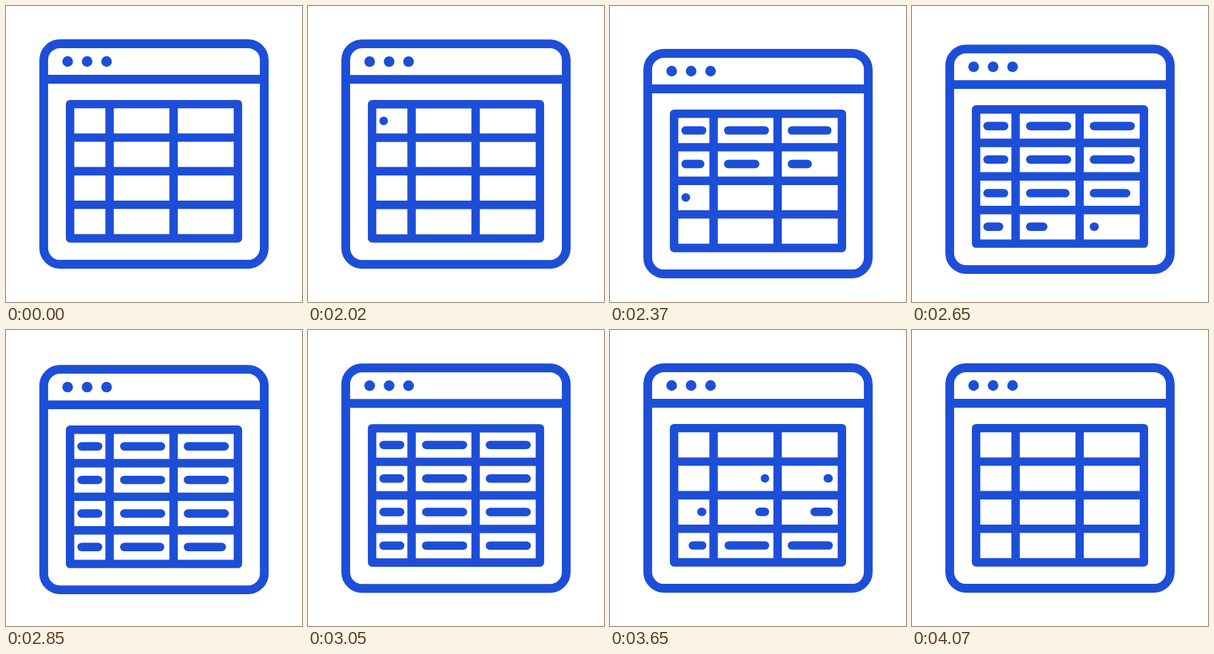
An HTML page for the animation above (4.1 s loop, 400 by 400 pixels).

```html
<!DOCTYPE html>
<html lang="en">
<head>
<meta charset="utf-8">
<title>Table filling</title>
<style>
  html, body { margin: 0; width: 100%; height: 100%; overflow: hidden; background: #fff; }
  svg { display: block; width: 100vw; height: 100vh; }
  .lines { fill: none; stroke: #1d4ed8; stroke-width: 11.4; }
  .frame { stroke-width: 11.8; }
  .bars { stroke-linecap: round; }
  .dots { fill: #1d4ed8; }
</style>
</head>
<body>
<svg viewBox="0 0 400 400">
  <g id="window">
    <g class="lines frame">
      <rect x="51" y="51" width="298" height="298" rx="22"/>
      <path d="M51 99H349"/>
    </g>
    <g class="dots">
      <circle cx="83.3" cy="75" r="7.2"/>
      <circle cx="109.6" cy="75" r="7.2"/>
      <circle cx="135.9" cy="75" r="7.2"/>
    </g>
    <g class="lines">
      <rect x="86.6" y="132.6" width="226.8" height="181.4" stroke-linejoin="round"/>
      <path d="M86.6 177.9H313.4M86.6 223.2H313.4M86.6 268.6H313.4M140 132.6V314M226.5 132.6V314"/>
    </g>
    <g id="bars" class="lines bars"></g>
  </g>
</svg>
<script>
const LOOP = 4100;
const BAR_TIME = 350;
const GROW = { start: 2005, row: 172, col: 55 };
const SHRINK = { start: 3082, row: 161, col: 67 };
const COLUMNS = [[102.1, 124.5], [159.8, 209.4], [245.9, 295.4]];
const DROP = 13;

const clamp = v => Math.min(1, Math.max(0, v));

// Cubic bezier easing from (0,0) to (1,1) with flat ends
function ease(x1, x2) {
  return x => {
    let lo = 0, hi = 1;
    for (let i = 0; i < 24; i++) {
      const u = (lo + hi) / 2, v = 1 - u;
      if (3 * u * v * v * x1 + 3 * u * u * v * x2 + u ** 3 < x) lo = u;
      else hi = u;
    }
    return lo * lo * (3 - 2 * lo);
  };
}
const barEase = ease(0.28, 0.1);
const dropEase = ease(0.333, 0.333);

const win = document.getElementById('window');
const group = document.getElementById('bars');
const bars = [];
for (let row = 0; row < 4; row++) {
  COLUMNS.forEach(([left, right], col) => {
    const line = document.createElementNS('http://www.w3.org/2000/svg', 'line');
    const y = 155.1 + row * 45.35;
    line.setAttribute('y1', y);
    line.setAttribute('y2', y);
    group.append(line);
    const at = phase => phase.start + row * phase.row + col * phase.col;
    bars.push({ line, left, right, grow: at(GROW), shrink: at(SHRINK) });
  });
}

const progress = (t, start, length) => clamp((t - start) / length);

function draw(t) {
  const down = dropEase(progress(t, 2005, 365));
  const up = dropEase(progress(t, 2370, 800));
  win.setAttribute('transform', `translate(0 ${(DROP * (down - up)).toFixed(3)})`);

  for (const { line, left, right, grow, shrink } of bars) {
    const visible = t >= grow && t < shrink + BAR_TIME;
    line.setAttribute('visibility', visible ? 'visible' : 'hidden');
    if (!visible) continue;
    const width = right - left;
    line.setAttribute('x1', left + width * barEase(progress(t, shrink, BAR_TIME)));
    line.setAttribute('x2', left + width * barEase(progress(t, grow, BAR_TIME)) + 0.01);
  }
}

const begin = performance.now();
function tick() {
  draw((performance.now() - begin) % LOOP);
  requestAnimationFrame(tick);
}
tick();
</script>
</body>
</html>
```
